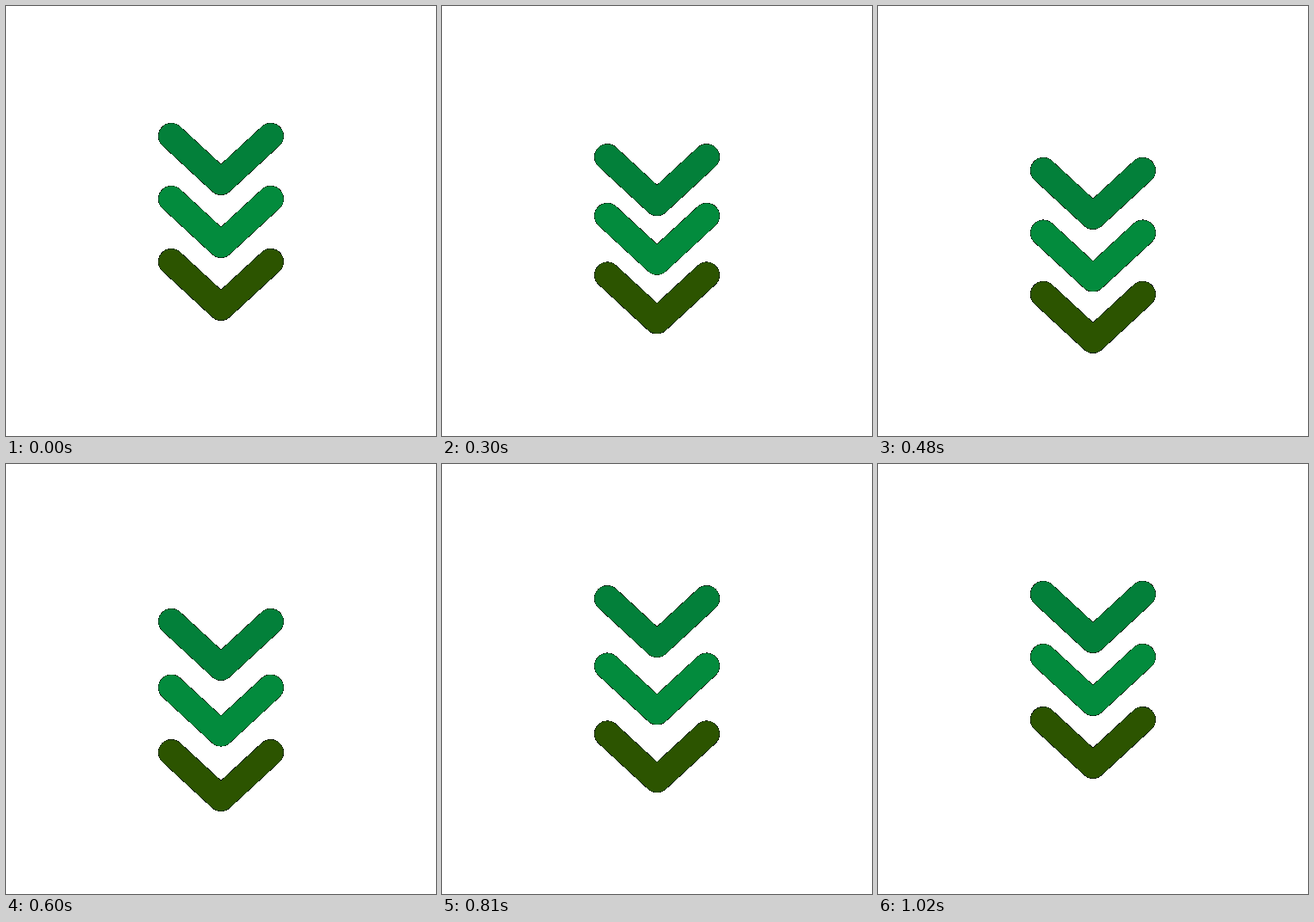
An HTML page for the animation above (1050 ms loop, 500 by 500 pixels).

```html
<!DOCTYPE html>
<html lang="en">
<head>
<meta charset="utf-8">
<title>Scroll down chevrons</title>
<style>
  html, body { margin: 0; width: 100%; height: 100%; overflow: hidden; background: #fff; }
  svg { display: block; width: 100vw; height: 100vh; }
  use { fill: none; stroke-linecap: round; stroke-linejoin: round; }
  /* Hard dark rim under a smooth body */
  .edge { stroke: #000; stroke-width: 30.8; shape-rendering: crispEdges; }
  .body { stroke-width: 29.9; }
</style>
</head>
<body>
<svg viewBox="0 0 500 500">
  <defs><path id="chevron" d="M192.3 151.3 L250 204.6 L307.7 151.3"/></defs>
  <g class="arrow"><use class="edge" href="#chevron"/><use class="body" href="#chevron" stroke="#03803a"/></g>
  <g class="arrow"><use class="edge" href="#chevron"/><use class="body" href="#chevron" stroke="#038b3d"/></g>
  <g class="arrow"><use class="edge" href="#chevron"/><use class="body" href="#chevron" stroke="#2c5400"/></g>
</svg>
<script>
  const LOOP = 1050, STEP = 30, GAP = 73, DROP = 40;
  const arrows = [...document.querySelectorAll('.arrow')];

  // Start of the drop, lowest point and return to rest, in ms
  const timing = [
    [66, 476, 906],
    [96, 506, 964],
    [126, 536, 1026]
  ];

  const ease = (t, from, to) => {
    const u = Math.min(1, Math.max(0, (t - from) / (to - from)));
    return u * u * (3 - 2 * u);
  };

  function draw(t) {
    arrows.forEach((arrow, i) => {
      const [start, low, rest] = timing[i];
      const y = i * GAP + DROP * (ease(t, start, low) - ease(t, low, rest));
      arrow.setAttribute('transform', `translate(0 ${y.toFixed(2)})`);
    });
  }

  let origin;
  function tick(now) {
    origin ??= now;
    const t = (now - origin) % LOOP;
    draw(Math.floor((t + 0.01) / STEP) * STEP);
    requestAnimationFrame(tick);
  }
  draw(0);
  requestAnimationFrame(tick);
</script>
</body>
</html>
```
